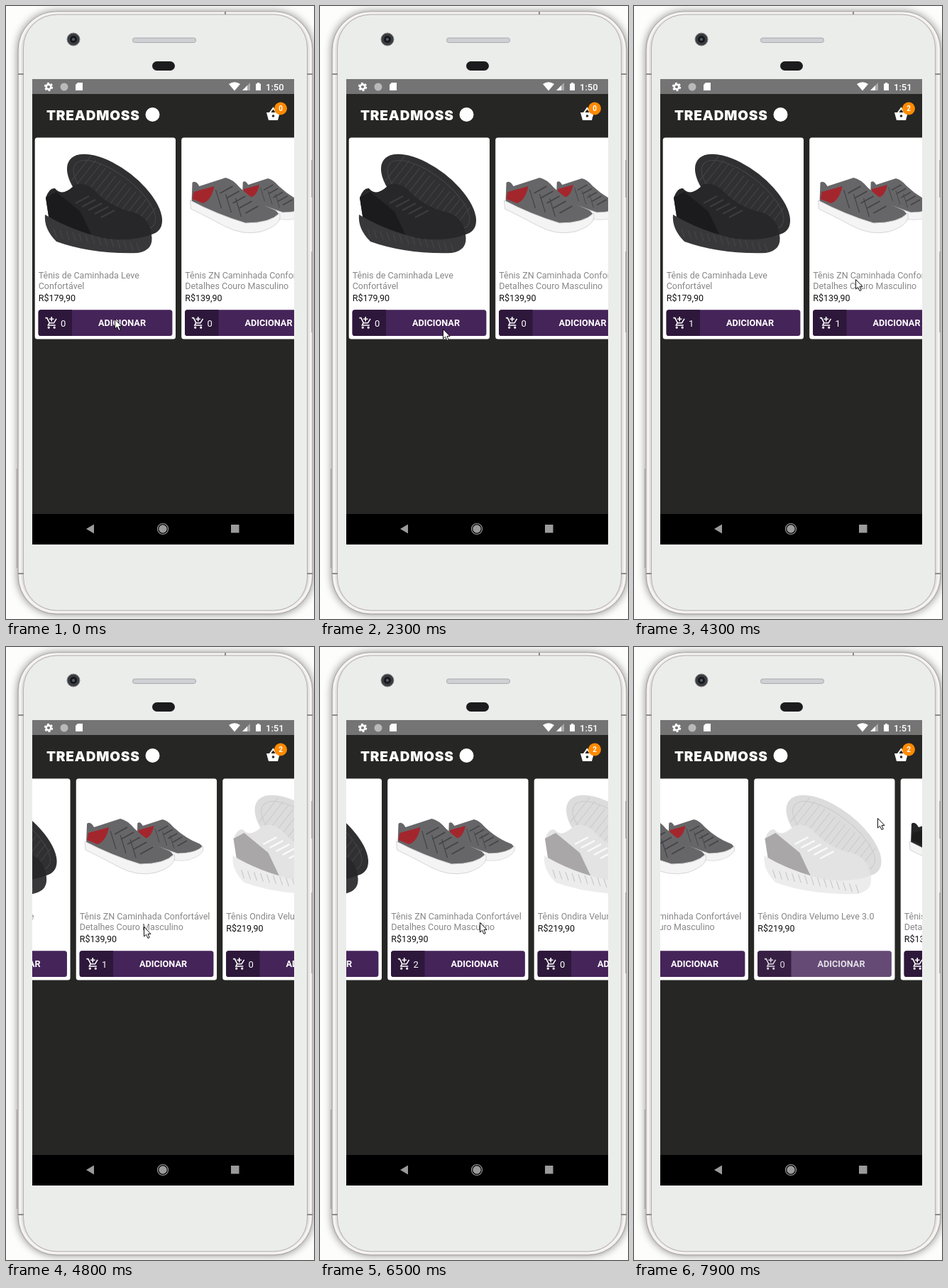
An HTML page for the animation above (8 s loop, 434 by 864 pixels).

```html
<!DOCTYPE html>
<html lang="pt-BR">
<head>
<meta charset="utf-8">
<title>Loja de tênis</title>
<style>
html, body { margin: 0; width: 100%; height: 100%; overflow: hidden; background: #fdfdfc; }
svg { display: block; }
text { font-family: Roboto, sans-serif; font-size: 12.5px; }
.brand { font: 900 19px Inter, sans-serif; letter-spacing: .8px; fill: #fff; }
.title { fill: #878787; }
.price { fill: #111; }
.count { font-size: 13px; fill: #fff; }
.add { font-size: 12.7px; font-weight: 700; fill: #fff; text-anchor: middle; }
.badge { font-size: 10px; font-weight: 700; fill: #fff; text-anchor: middle; }
.clock { font-size: 13px; font-weight: 500; fill: #fff; }
.body { filter: drop-shadow(0 0 6px #8a8a88); }
</style>
</head>
<body>
<svg width="434" height="864" viewBox="0 0 434 864">
  <defs>
    <clipPath id="screen"><path d="M37 103H406V759H37Z"/></clipPath>
    <g id="cart" fill="none" stroke="#fff" stroke-width="2">
      <path d="M1 3H4L8.500 12H16L20.500 4.500M8 12 6 16H19M12 1V9M8 5H16"/>
      <circle cx="7" cy="20" r="1"/><circle cx="17" cy="20" r="1"/>
    </g>
  </defs>

  <!-- phone body -->
  <rect class="body" x="17" y="8" width="415" height="849" rx="54" fill="#e3e0de" stroke="#a5a09e"/>
  <rect x="20" y="10" width="409" height="844" rx="51" fill="none" stroke="#f6f4f3" stroke-width="3"/>
  <rect x="24.500" y="12" width="400" height="840" rx="47" fill="#ebedeb" stroke="#b3aeac"/>
  <path stroke="#a8a4a2" stroke-width="1.500" d="M15.500 652V792M431 217V270M431 346V460"/>
  <path stroke="#8f8b89" stroke-width="2" d="M17 96H25M424 96H432M17 800H25M424 800H432M309 8V12"/>
  <circle cx="95" cy="47" r="9" fill="#3b3d40" stroke="#85878a"/>
  <circle cx="95" cy="47" r="5" fill="#16181c"/>
  <circle cx="95" cy="47" r="2" fill="#536070"/>
  <rect x="178.500" y="45" width="89" height="6.500" rx="3" fill="#cfd0d3" stroke="#a9aaae"/>
  <rect x="206" y="78" width="32" height="13" rx="6.500" fill="#1c1c1e"/>

  <!-- screen -->
  <path fill="#262625" d="M37 103H406V759H37Z"/>
  <path fill="#747474" d="M37 103H406V124H37Z"/>
  <path d="M37 716H406V759H37Z"/>
  <g fill="#fff">
    <circle cx="60" cy="114" r="3.400" fill="none" stroke="#fff" stroke-width="2.600"/>
    <circle cx="60" cy="114" r="5.200" fill="none" stroke="#fff" stroke-width="2" stroke-dasharray="2.800 2.650"/>
    <circle cx="82" cy="114" r="5.500" fill="#b9b9b9"/>
    <path d="M101 108h7v11h-10v-8z"/>
    <path d="M314 110Q322 104.500 330 110L322 119.500Z"/>
    <path fill="#a9a9a9" d="M344 108V119H333Z"/>
    <path d="M340 112V119H333ZM354 108h3v1.500h2V119h-7v-9.500h2z"/>
    <circle cx="206.500" cy="153" r="10"/>
    <path d="M367 150H386L383 161H370Z"/>
    <path fill="none" stroke="#fff" stroke-width="2" d="M371.500 151 376.500 144 381.500 151"/>
    <circle cx="376.500" cy="155" r="1.800" fill="#262625"/>
  </g>
  <text class="clock" x="366" y="118.500" id="clock"></text>
  <text class="brand" x="57" y="160.500">TREADMOSS</text>
  <circle cx="387" cy="144.500" r="9" fill="#ff8a00"/>
  <text class="badge" x="387" y="148.200" id="badge"></text>
  <g clip-path="url(#screen)"><g id="list"></g></g>
  <path fill="#9b9b9b" d="M113 737 124 730.500V743.500ZM317 731H328.500V742.500H317Z"/>
  <circle cx="221" cy="737" r="7.500" fill="none" stroke="#9b9b9b" stroke-width="1.200"/>
  <circle cx="221" cy="737" r="5.700" fill="#9b9b9b"/>
  <path id="cursor" fill="#fff" stroke="#111" d="M.5.5V14L3.500 11.200 6 16.500 8.200 15.500 6 10.400H10Z"/>
</svg>
<script>
const $ = id => document.getElementById(id);
const PITCH = 206.5, STEP = 100, LOOP = 8000;

const shape = (fill, d) => `<path fill="${fill}" d="${d}"/>`;
const lines = (color, width, d) =>
  `<path fill="none" stroke="${color}" stroke-width="${width}" d="${d}"/>`;

// n parallel strokes, each shifted by (sx, sy)
const hatch = (n, x, y, dx, dy, sx, sy) =>
  Array.from({ length: n }, (_, i) => `M${x + i * sx} ${y + i * sy}l${dx} ${dy}`).join('');

// One shoe lying behind with its sole up, one standing in front
const runner = ({ back, front, heel, sole, tread, lace }) => `
  <g transform="translate(112 80) rotate(38)">
    <ellipse rx="80" ry="37" fill="${back}"/>
    <ellipse rx="70" ry="28" fill="none" stroke="${tread}"/>
    ${lines(tread, 1, hatch(14, -60, -22, 0, 44, 9, 0))}
  </g>` +
  shape(front, 'M15 84Q20 70 28 71Q38 84 56 66Q70 62 82 72Q105 98 140 105Q164 115 164 140L120 155L22 130Z') +
  shape(heel, 'M15 84L30 76L64 104L82 142L22 130Z') +
  lines(lace, 2.5, hatch(5, 57, 92, 19, -10, 9, 5)) +
  shape(sole, 'M14 108Q50 130 100 142Q140 146 164 136Q168 158 145 162Q80 164 30 146Q12 128 14 108Z') +
  lines(tread, 1.2, hatch(14, 26, 128, 4, 12, 9, 1.6));

// A pair: the same shoe drawn twice, the rear one smaller
const walker = ({ body, heel, lace }) => {
  const shoe =
    shape(body, 'M15 63Q20 59 25 68L62 56Q72 58 82 70Q105 92 132 102Q139 107 138 115L90 126L14 92Z') +
    shape(heel, 'M17 76L46 68Q42 88 30 92L15 86Z') +
    lines(lace, 2, hatch(5, 54, 78, 18, -10, 9, 7)) +
    lines(lace, 1.2, hatch(3, 48, 73, 8, 26, 14, 6)) +
    '<path fill="#f4f4f4" stroke="#d6d6d6" d="M12 88Q50 108 90 120Q125 120 138 106Q143 122 112 132Q86 138 60 124Q30 108 13 100Z"/>';
  return `<g transform="translate(75 15) scale(.75)">${shoe}</g>${shoe}`;
};

const walking = { title: ['Tênis ZN Caminhada Confortável', 'Detalhes Couro Masculino'], price: '139,90' };
const products = [
  { title: ['Tênis de Caminhada Leve', 'Confortável'], price: '179,90',
    art: runner({ back: '#303032', front: '#27272a', heel: '#1b1b1d', sole: '#38383a', tread: '#454547', lace: '#3b3b3d' }) },
  { ...walking, art: walker({ body: '#666668', heel: '#a3262d', lace: '#444447' }) },
  { title: ['Tênis Ondira Velumo Leve 3.0'], price: '219,90',
    art: runner({ back: '#dcdcdd', front: '#e3e3e4', heel: '#aaa7a8', sole: '#ececec', tread: '#cacaca', lace: '#fafafa' }) },
  { ...walking, art: walker({ body: '#262628', heel: '#1c1c1d', lace: '#454547' }) }
];

$('list').innerHTML = products.map(({ title, price, art }, i) => `
  <g transform="translate(${41 + i * PITCH} 186)">
    <rect x="-.3" y="-.4" width="198.300" height="283.800" rx="3.500" fill="#fff"/>
    ${art}
    ${title.map((line, n) => `<text class="title" x="4.700" y="${198 + n * 14.6}">${line}</text>`).join('')}
    <text class="price" x="4.700" y="${215.4 + (title.length - 1) * 14.6}">R$${price}</text>
    <g id="button${i}">
      <rect x="4.600" y="242.200" width="188.800" height="36.800" rx="3.500" fill="#452459"/>
      <path fill="#2d173a" d="M52 242.200V279H8.100q-3.500 0-3.500-3.500V245.700q0-3.500 3.500-3.500z"/>
      <use href="#cart" transform="translate(13.600 251.200) scale(.8)"/>
      <text class="count" x="36" y="265.700" id="count${i}"></text>
      <text class="add" x="122.500" y="265.400">ADICIONAR</text>
    </g>
  </g>`).join('');

// The last press is dragged off the button, so it adds nothing
const presses = [
  { item: 0, down: 2400, up: 2500, adds: 1 },
  { item: 1, down: 3400, up: 3600, adds: 1 },
  { item: 1, down: 5300, up: 5500, adds: 1 },
  { item: 2, down: 7400, up: 7600, adds: 0 }
];

// Each move: [start, end, ...destination]
const swipes = [[4300, 5000, 152], [6500, 7300, 284.5]];
const pointerMoves = [
  [1000, 1400, 391, 154],
  [1600, 2300, 173, 455],
  [2500, 2900, 324, 447],
  [3900, 4300, 312, 385],
  [4300, 4700, 194, 394],
  [4800, 5000, 215, 447],
  [5500, 5800, 79, 449],
  [5800, 6100, 319, 447],
  [6100, 6500, 225, 388],
  [6500, 7000, 110, 390],
  [7000, 7300, 262, 449],
  [7600, 7900, 343, 241]
];

const easeInOut = p => p < .5 ? 2 * p * p : 1 - 2 * (1 - p) ** 2;
const easeOut = p => 1 - (1 - p) ** 3;
const progress = (t, start, end) => Math.min(1, Math.max(0, (t - start) / (end - start)));

const follow = (moves, origin, ease, t) => moves.reduce((at, [start, end, ...to]) => {
  const p = ease(progress(t, start, end));
  return at.map((v, i) => v + (to[i] - v) * p);
}, origin);

function opacity(item, t) {
  const press = presses.findLast(p => p.item === item && t >= p.down);
  return press ? .2 + .8 * easeInOut(progress(t, press.up + 100, press.up + 400)) : 1;
}

function draw(now) {
  const t = Math.floor(now % LOOP / STEP) * STEP;
  const counts = products.map((_, i) =>
    presses.filter(p => p.item === i && p.adds && t >= p.up + 100).length);
  counts.forEach((count, i) => {
    $('count' + i).textContent = count;
    // Every layer fades on its own, so overlapping layers stay denser
    for (const paint of ['fill', 'stroke'])
      $('button' + i).setAttribute(paint + '-opacity', opacity(i, t));
  });
  $('badge').textContent = counts.filter(Boolean).length;
  $('clock').textContent = t < 3900 ? '1:50' : '1:51';
  $('list').setAttribute('transform', `translate(${-follow(swipes, [0], easeOut, t)})`);
  $('cursor').setAttribute('transform', `translate(${follow(pointerMoves, [153, 441], easeInOut, t)})`);
}

const start = performance.now();
function frame() {
  draw(performance.now() - start);
  requestAnimationFrame(frame);
}
frame();
</script>
</body>
</html>
```
